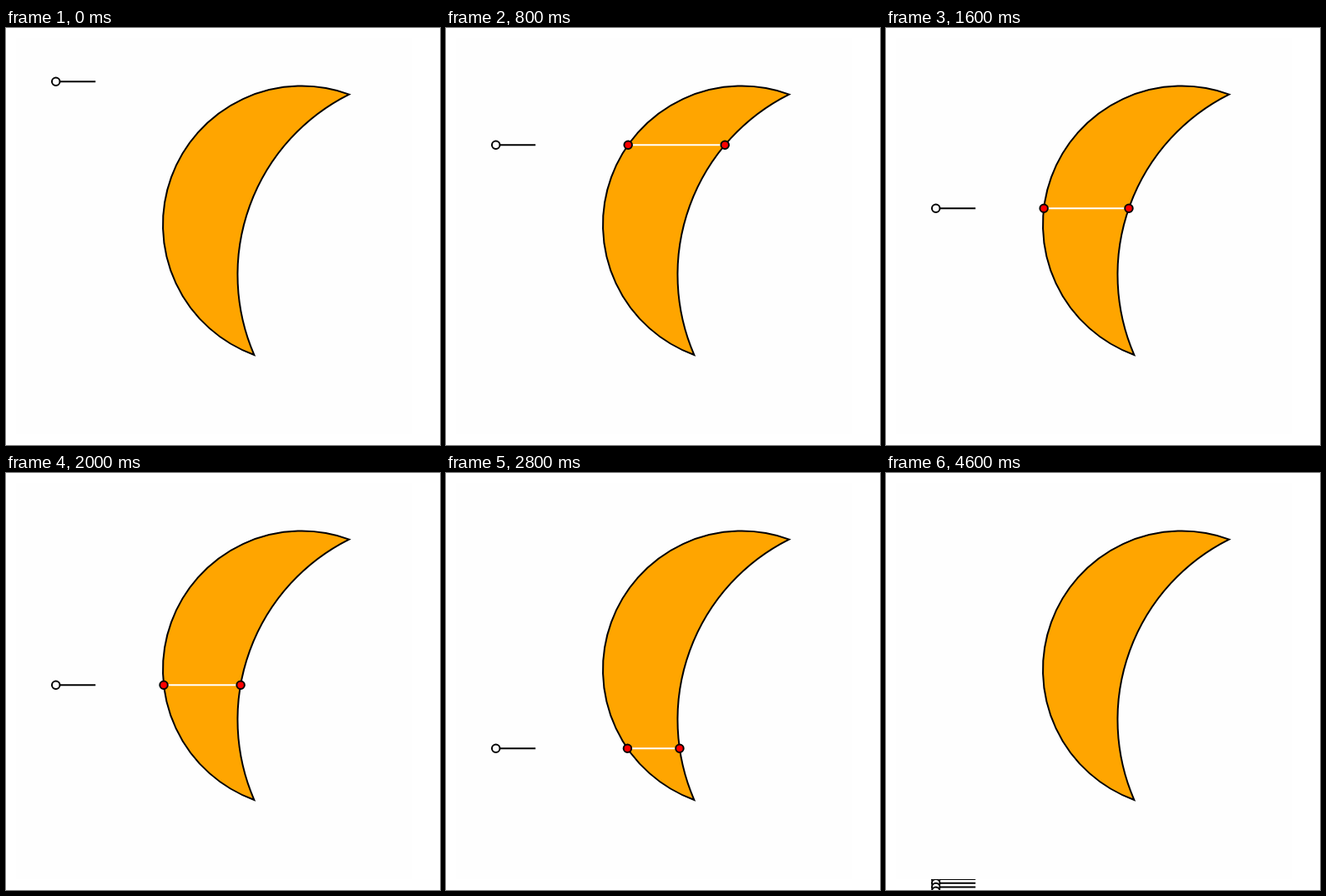
Animation of 520x500 px, one loop 4.95 s. Source, as an HTML page with a canvas:

```html
<!DOCTYPE html>
<html lang="en">
<head>
<meta charset="utf-8">
<title>Scanline across a crescent</title>
<style>
  html, body { margin: 0; width: 100%; height: 100%; overflow: hidden; background: #fff; }
  canvas { display: block; }
</style>
</head>
<body>
<canvas id="stage" width="520" height="500"></canvas>
<script>
const ctx = document.getElementById('stage').getContext('2d');

const LOOP = 4950, TICK = 50, LAST = 92;
const START_Y = 64.25, STEP_Y = 4.75;
const PANEL = { x: 12, y: 12, size: 475 };
const TRAIL_FROM = 88; // markers from here on spill below the panel
const DOT = 4.75;

// The inner circle passes through both ends of a diameter of the outer one.
const TILT = Math.PI / 9, OFFSET = 175.75;
const outer = { x: 354.25, y: 235.8, r: 166.25 };
const inner = {
  x: outer.x + OFFSET * Math.cos(TILT),
  y: outer.y + OFFSET * Math.sin(TILT),
  r: Math.hypot(outer.r, OFFSET)
};
const half = Math.atan2(outer.r, OFFSET);

const rowY = n => START_Y + n * STEP_Y;
const inside = (c, x, y) => Math.hypot(x - c.x, y - c.y) < c.r;

function crossings(c, y) {
  const d = c.r * c.r - (y - c.y) ** 2;
  return d < 0 ? [] : [c.x - Math.sqrt(d), c.x + Math.sqrt(d)];
}

function hits(y) {
  return [
    ...crossings(outer, y).filter(x => !inside(inner, x, y)),
    ...crossings(inner, y).filter(x => inside(outer, x, y))
  ].sort((a, b) => a - b);
}

function line(x1, x2, y, color) {
  ctx.beginPath();
  ctx.moveTo(x1, y);
  ctx.lineTo(x2, y);
  ctx.strokeStyle = color;
  ctx.stroke();
}

function dot(x, y, color) {
  ctx.beginPath();
  ctx.arc(x, y, DOT, 0, Math.PI * 2);
  ctx.fillStyle = color;
  ctx.strokeStyle = '#000';
  ctx.fill();
  ctx.stroke();
}

function marker(n) {
  const y = rowY(n);
  line(59.75, 107.25, y, '#000');
  dot(59.75, y, '#fff');
}

function crescent() {
  ctx.beginPath();
  ctx.arc(outer.x, outer.y, outer.r, TILT + Math.PI / 2, TILT + Math.PI * 1.5);
  ctx.arc(inner.x, inner.y, inner.r, TILT + Math.PI + half, TILT + Math.PI - half, true);
  ctx.closePath();
  ctx.fillStyle = '#ffa500';
  ctx.strokeStyle = '#000';
  ctx.fill();
  ctx.stroke();
}

function draw(n) {
  ctx.lineWidth = 2;
  ctx.fillStyle = '#fff';
  ctx.fillRect(0, 0, 520, 500);
  for (let k = TRAIL_FROM; k < n; k++) marker(k);
  ctx.fillStyle = '#fefefe';
  ctx.fillRect(PANEL.x, PANEL.y, PANEL.size, PANEL.size);

  crescent();
  marker(n);
  const y = rowY(n), xs = hits(y);
  if (xs.length > 1) line(xs[0], xs[xs.length - 1], y, '#fff');
  xs.forEach(x => dot(x, y, '#f00'));
}

const begin = performance.now();
function tick() {
  const t = Math.max(0, performance.now() - begin) % LOOP;
  draw(Math.min(LAST, Math.floor(t / TICK)));
  requestAnimationFrame(tick);
}
tick();
</script>
</body>
</html>
```
